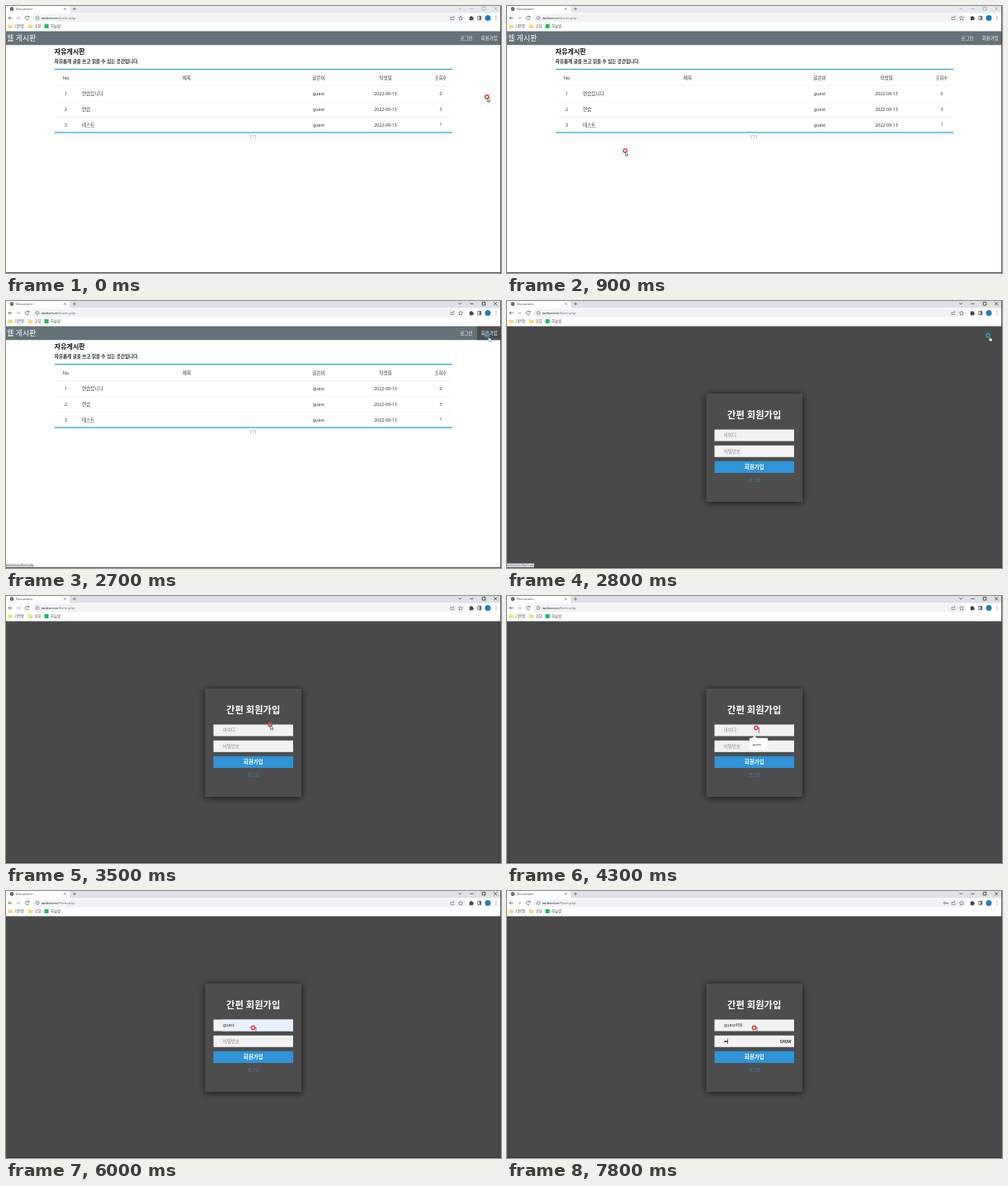
These frames come from a looping animation (600 px wide and 323 px high, 8 s). An HTML page:

```html
<!DOCTYPE html>
<html lang="ko">
<head>
<meta charset="utf-8">
<title>Document</title>
<style>
  html, body { margin: 0; width: 100%; height: 100%; overflow: hidden; background: #fff; }
  svg { display: block; width: 100vw; height: 100vh; }
  text { font-family: "Noto Sans", "Noto Sans CJK KR", "Noto Sans CJK", sans-serif; white-space: pre; }
  .line { fill: none; stroke: #5f6368; stroke-width: .8; }
</style>
</head>
<body>
<svg id="stage" viewBox="0 0 600 323"></svg>
<script>
const LOOP = 8000, STEP = 100;
const HOST = 'webserver', USER = 'guest';

// Text centred vertically on y
const text = (x, y, size, str, fill = '#333', extra = '') =>
  `<text x="${x}" y="${y + size * .36}" font-size="${size}" fill="${fill}" ${extra}>${str}</text>`;
const mid = (x, y, size, str, fill, extra = '') =>
  text(x, y, size, str, fill, `text-anchor="middle" ${extra}`);
const rect = (x, y, w, h, fill, extra = '') =>
  `<rect x="${x}" y="${y}" width="${w}" height="${h}" fill="${fill}" ${extra}/>`;
const line = (d, extra = '') => `<path class="line" d="${d}" ${extra}/>`;
const group = (id, body) => `<g id="${id}">${body}</g>`;
const BOLD = 'font-weight="700"';

const folder = x =>
  `<path d="M${x} 22.3h2l.8.8h2.4v4h-5.2z" fill="#fbd775"/>`;

const browser = () => [
  rect(0, 0, 600, 9, '#e7eaed', 'id="strip"'),
  '<path d="M0 0H75q2 0 2 2V6.500q0 2 2 2H0z" fill="#fff"/>',
  '<circle cx="7" cy="3.600" r="2.300" fill="#4d5156"/>',
  line('M5.500 3.200l1.500 .8 1.200-1.500', 'style="stroke:#fff;stroke-width:.5"'),
  text(12, 3.5, 4.1, 'Document', '#45494d'),
  line('M70 2.200l2.600 2.600m0-2.600l-2.600 2.600M81 3.500h4M83 1.500v4', 'style="stroke-width:.7"'),
  line('M548.500 2.300l1.700 1.700 1.700-1.700M562.500 3.300h4M577.300 1.400h3.600v3.600h-3.600zM591.300 1.300l4 4m0-4l-4 4', 'id="controls"'),
  rect(0, 8.5, 600, 22, '#fff'),
  line('M7.500 14.500h-4.500m2-2l-2 2 2 2'),
  line('M12.500 14.500h4.500m-2-2l2 2-2 2', 'style="stroke:#b8babd"'),
  line('M27.600 13.200a2.200 2.200 0 1 0 .2 2M28 11.800v1.700h-1.700'),
  rect(32, 9.8, 525, 9.6, '#f1f3f4', 'rx="4.800"'),
  '<circle class="line" cx="38" cy="14.500" r="2" style="stroke-width:.6"/>',
  line('M38 14.200v1.300M38 13.300v.4', 'style="stroke-width:.5"'),
  `<text id="url" x="43" y="16" font-size="4.200" fill="#6a6e73"><tspan fill="#222">${HOST}</tspan><tspan id="path"></tspan></text>`,
  group('key', line('M532 14.500h2.600v1.200') + '<circle class="line" cx="530.500" cy="14.500" r="1.200"/>'),
  line('M540.500 13.500h-1.500v3h4v-1.500M540.500 15q.5-2 2.500-2m-1-1.200l1.200 1.200-1.200 1.200', 'style="stroke-width:.6"'),
  line('M551 12l.8 1.700 1.800.2-1.300 1.300.3 1.800-1.600-.9-1.600.9.3-1.800-1.300-1.300 1.800-.2z', 'style="stroke-width:.6"'),
  '<path d="M561.800 13h1.200a1 1 0 0 1 2 0h1v1.200a1 1 0 0 1 0 2v1h-4.200z" fill="#45494d"/>',
  line('M571.800 12.300h4v4.400h-4z'),
  rect(573.8, 12.3, 2, 4.4, '#5f6368'),
  '<circle cx="584" cy="14.500" r="3.500" fill="#1c80bd"/>',
  [12.5, 14.5, 16.5].map(y => `<circle cx="594" cy="${y}" r=".55" fill="#5f6368"/>`).join(''),
  folder(2.6), text(10, 24.7, 4.3, '기본함', '#444'),
  folder(27), text(34.5, 24.7, 4.3, '코딩', '#444'),
  rect(46.6, 22, 5, 5, '#14c35b'), text(54, 24.7, 4.3, '하늘빛', '#444')
].join('');

const posts = [['연습입니다', 0], ['연습', 3], ['테스트', 1]];
const board = () => [
  rect(0, 30, 600, 17.2, '#64727a'),
  rect(546, 30, 25, 17.2, '#4e4e4e', 'id="loginHover"'),
  rect(571, 30, 29, 17.2, '#4e4e4e', 'id="joinHover"'),
  text(1, 38.8, 9, '웹 게시판', '#fff'),
  text(550.5, 38.8, 5.5, '로그인', '#fff'),
  text(575.7, 38.8, 5.5, '회원가입', '#fff'),
  text(58.8, 55.2, 8, '자유게시판', '#111', BOLD),
  text(58.8, 66.8, 5.55, '자유롭게 글을 쓰고 읽을 수 있는 공간입니다.', '#222', BOLD),
  rect(59, 75.9, 482, 1.4, '#40b0d2'),
  [['No', 72.5], ['제목', 219], ['글쓴이', 379], ['작성일', 460]]
    .map(([label, x]) => mid(x, 87, 5.6, label)).join(''),
  mid(527, 87, 5.2, '조회수'),
  posts.map(([title, views], i) => {
    const y = 106 + i * 18.8;
    return rect(59, y - 9.6, 482, .5, '#ececec') + mid(72.5, y, 5.3, i + 1) +
      text(92, y, 5.6, title) + mid(379, y, 5.3, USER) +
      mid(460, y, 5.3, '2022-09-13') + mid(527, y, 5.1, views);
  }).join(''),
  rect(59, 152.4, 482, 1.4, '#40b0d2'),
  mid(299.5, 158, 6, '[1]', '#8095d0')
].join('');

const form = () => [
  rect(0, 30, 600, 293, '#494949'),
  rect(241.5, 112, 116.5, 131, '#4d4d4d', 'filter="url(#shadow)"'),
  mid(299.7, 137.8, 11.3, '간편 회원가입', '#fff', BOLD),
  rect(251.5, 155.5, 96.5, 14, '#f2f2f2'),
  rect(262, 155.5, 86, 14, '#e8f0fe', 'id="filled"'),
  text(263, 162.5, 5.4, '아이디', '#858585', 'id="idHint"'),
  text(263, 162.5, 5.2, '', '#333', 'id="idValue"'),
  rect(251.5, 174.8, 96.5, 14, '#f2f2f2'),
  text(263, 181.8, 5.4, '비밀번호', '#858585', 'id="pwHint"'),
  '<circle id="dot1" cx="264.300" cy="182" r=".95" fill="#222"/>',
  '<circle id="dot2" cx="266.300" cy="182" r=".95" fill="#222"/>',
  text(331, 182, 4.4, 'SHOW', '#333', `id="show" ${BOLD}`),
  rect(0, 0, .6, 6.5, '#222', 'id="caret"'),
  rect(251.5, 193.8, 96.5, 14.2, '#2f94d9'),
  mid(299.7, 200.8, 6.5, '회원가입', '#fff', BOLD),
  mid(299.7, 216, 5.1, '로그인', '#3787bd'),
  group('menu',
    '<path d="M297 172l3-3 3 3z" fill="#fff"/>' +
    rect(294, 171.8, 22, 14.4, '#fff', 'rx=".8"') +
    rect(294, 175.5, 22, 8, '#e9eaec', 'id="menuHover"') +
    text(297.5, 179.5, 4, USER, '#333'))
].join('');

const pointer = group('pointer',
  '<circle id="ring" r="2.200" fill="none" stroke-width="1.500"/>' +
  '<path id="arrow" d="M.3 1v5l1.200-1 .8 1.700 .9-.4-.8-1.700h1.500z" fill="#fff" stroke="#222" stroke-width=".55"/>' +
  '<path id="hand" d="M1.500 1.400q.7-.6 1.100.2v1.900l2 .6q.7.3.5 1.200l-.5 2h-2.300l-1.800-2.300q.2-.6 1 0z" fill="#fff" stroke="#222" stroke-width=".45"/>' +
  '<path id="beam" d="M2.700 0h1.600M3.500 0v5.500M2.700 5.500h1.600" fill="none" stroke="#444" stroke-width=".6"/>');

document.getElementById('stage').innerHTML =
  '<defs><filter id="shadow" x="-20%" y="-20%" width="140%" height="140%">' +
  '<feDropShadow dx="0" dy="1" stdDeviation="4.500" flood-color="#000" flood-opacity=".75"/></filter></defs>' +
  rect(0, 0, 600, 323, '#fff') + group('board', board()) + group('form', form()) + browser() +
  group('status', rect(0, 317.5, 33, 5.5, '#dfe2e6') + text(.3, 320.2, 3.5, '', '#666', 'id="statusText"')) +
  rect(0, 322.2, 600, .8, '#333') + rect(599.2, 0, .8, 323, '#444') + pointer;

const el = Object.fromEntries([...document.querySelectorAll('[id]')].map(e => [e.id, e]));
const show = (id, on) => { el[id].style.display = on ? '' : 'none'; };
const put = (id, str) => { if (el[id].textContent !== str) el[id].textContent = str; };

// time, x, y of the pointer ring
const route = [
  [0, 583, 110], [500, 360, 150], [1000, 118, 178], [1300, 260, 212], [1600, 470, 140],
  [1900, 564.7, 77], [2200, 560, 44], [2500, 582, 42], [2700, 583, 41.5], [2900, 583, 41.5],
  [3200, 430, 110], [3600, 300, 164], [3800, 300, 164], [4100, 302, 159.5], [4900, 302, 159.5],
  [5200, 302, 176], [5500, 301, 177], [5700, 298.5, 173], [5800, 299.5, 165.5], [LOOP, 299.5, 165.5]
];
const typed = [[0, ''], [5100, USER], [6500, USER + '4'], [6700, USER + '45'], [6800, USER + '456']];
// time, x, y of the text caret; no position hides it
const carets = [
  [0], [3800, 262.8, 159], [4300], [4900, 262.8, 159], [5100], [5500, 277, 159], [6000],
  [6500, 279.7, 159], [6700, 282.7, 159], [6800, 285.8, 159], [7000, 262.8, 178.5],
  [7600, 265.5, 178.5], [7800, 267.3, 178.5]
];
const latest = (table, t) => table.filter(row => row[0] <= t).pop();

function pointerAt(t) {
  const i = Math.max(1, route.findIndex(p => p[0] >= t));
  const [t0, x0, y0] = route[i - 1], [t1, x1, y1] = route[i];
  const k = (t - t0) / (t1 - t0), e = k * k * (3 - 2 * k);
  return [x0 + (x1 - x0) * e, y0 + (y1 - y0) * e];
}

function draw(t) {
  const within = (a, b) => t >= a && t < b;
  const joined = t >= 2800, active = t >= 2600;
  const onLogin = within(2200, 2400), onJoin = within(2400, 2800);
  const onMenu = within(5100, 5500);

  show('board', !joined);
  show('form', joined);
  show('loginHover', onLogin);
  show('joinHover', onJoin);
  el.strip.setAttribute('fill', active ? '#dee1e6' : '#e7eaed');
  el.controls.style.stroke = active ? '#333' : '#a0a3a7';
  put('path', joined ? '/form.php' : '/posts.php');
  show('status', within(2200, 3100));
  put('statusText', HOST + (onLogin ? '/enter.php' : '/form.php'));

  const value = latest(typed, t)[1];
  put('idValue', value);
  show('idHint', !value);
  show('filled', within(5100, 6500));
  show('menu', within(3900, 5500));
  show('menuHover', onMenu);
  show('pwHint', t < 7600);
  show('dot1', t >= 7600);
  show('dot2', t >= 7800);
  show('show', t >= 7600);
  show('key', t >= 7600);

  const [, cx, cy] = latest(carets, t);
  show('caret', cx !== undefined);
  if (cx) el.caret.setAttribute('transform', `translate(${cx} ${cy})`);

  const [x, y] = pointerAt(t);
  el.pointer.setAttribute('transform', `translate(${x} ${y})`);
  const hand = within(2200, 3000), beam = within(3600, 5000) || t >= 5800;
  show('hand', hand);
  show('beam', beam);
  show('arrow', !hand && !beam);
  const pressed = within(2600, 2900) || t === 3800 || t === 5400;
  el.ring.setAttribute('stroke', pressed ? '#2b9cc4' : '#e2443f');
  el.ring.setAttribute('fill', joined ? (beam ? '#f3e4e1' : 'none') : pressed ? 'none' : '#fff');
}

const start = performance.now();
function tick() {
  const t = (performance.now() - start) % LOOP;
  draw(Math.floor(t / STEP) * STEP);
  requestAnimationFrame(tick);
}
tick();
</script>
</body>
</html>
```
